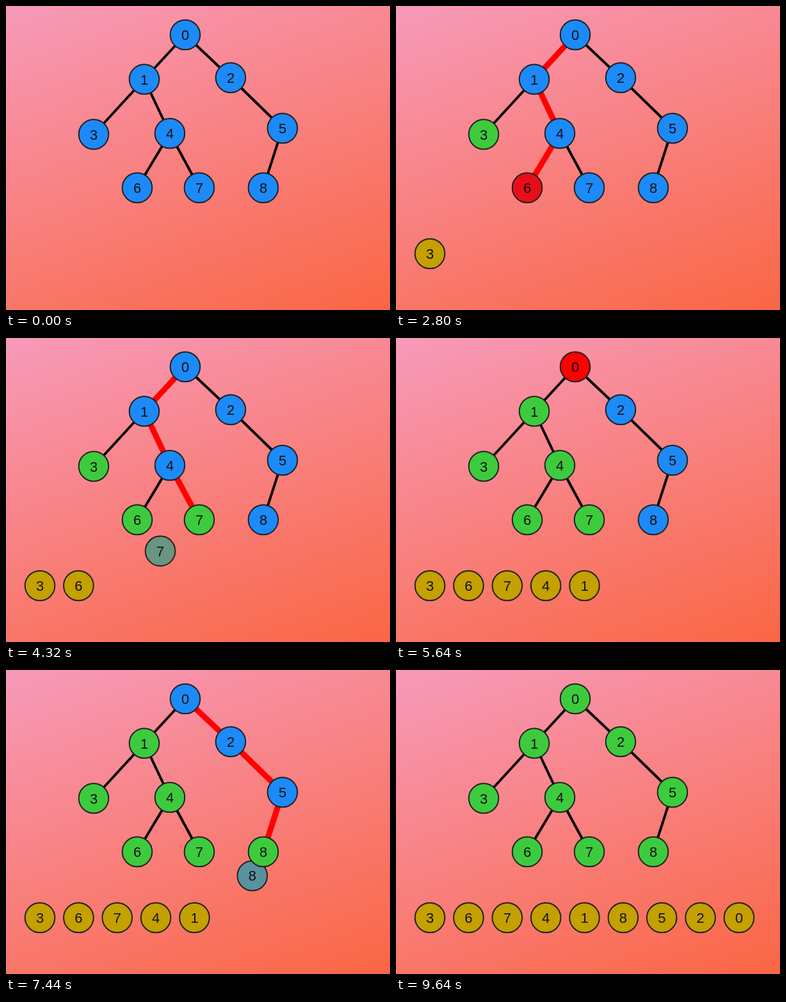
An HTML page with a canvas that plays this animation: 600 px wide and 475 px high, repeating every 9.68 s.

```html
<!DOCTYPE html>
<html lang="en">
<head>
<meta charset="utf-8">
<title>Post-order traversal</title>
<style>
  html, body { margin: 0; width: 100%; height: 100%; overflow: hidden; }
  body { background: linear-gradient(160deg, #f79aba, #fa6643); }
  canvas { display: block; width: 600px; height: 475px; }
</style>
</head>
<body>
<canvas id="stage" width="600" height="475"></canvas>
<script>
const ctx = document.getElementById('stage').getContext('2d');

const LOOP = 9680;
const STEP = 521.5;      // one visit
const START = 150;       // first visit begins
const FADE = 55;         // colour change of a node
const HOLD = 350;        // visit begin to fade out
const MOVE_AT = 460;     // visit begin to flight of the copy
const MOVE = 125;

const BLUE = [28, 138, 248];
const RED = [255, 0, 0];
const GREEN = [61, 203, 61];
const GOLD = [196, 160, 0];

const nodes = [
  [280, 45], [216, 114.5], [351, 112], [137, 200.5], [256, 199],
  [432, 191], [205, 284], [302, 284], [402, 284]
];
const children = { 0: [1, 2], 1: [3, 4], 2: [5], 4: [6, 7], 5: [8] };
const parent = {};
for (const p in children) for (const c of children[p]) parent[c] = +p;

// Every stop of the walk; the last stop at a node completes it.
const visits = [];
let finished = 0;
(function walk(id) {
  const stop = () => visits.push({ id, slot: -1, at: START + visits.length * STEP });
  stop();
  for (const c of children[id] || []) {
    walk(c);
    stop();
  }
  visits[visits.length - 1].slot = finished++;
})(0);

const ease = u => (1 - Math.cos(Math.PI * Math.min(1, Math.max(0, u)))) / 2;
const mix = (a, b, u) => a.map((v, i) => v + (b[i] - v) * u);
const rgb = c => `rgb(${c.map(Math.round).join(',')})`;

function nodeColor(id, t) {
  let color = BLUE;
  for (const v of visits) {
    if (v.id !== id || t < v.at) continue;
    color = mix(color, RED, ease((t - v.at) / FADE));
    color = mix(color, v.slot < 0 ? BLUE : GREEN, ease((t - v.at - HOLD) / FADE));
  }
  return color;
}

function drawEdges(t) {
  const current = visits.filter(v => v.at <= t).pop();
  const path = new Set();
  if (current) for (let id = current.id; id > 0; id = parent[id]) path.add(id);
  for (let id = 1; id < nodes.length; id++) {
    const hot = path.has(id);
    ctx.strokeStyle = hot ? '#f00' : '#000';
    ctx.lineWidth = hot ? 9 : 4;
    ctx.beginPath();
    ctx.moveTo(...nodes[parent[id]]);
    ctx.lineTo(...nodes[id]);
    ctx.stroke();
  }
}

function drawDisc([x, y], label, color) {
  ctx.beginPath();
  ctx.arc(x, y, 23.3, 0, Math.PI * 2);
  ctx.fillStyle = rgb(color);
  ctx.fill();
  ctx.strokeStyle = '#222';
  ctx.lineWidth = 2;
  ctx.stroke();
  ctx.fillStyle = '#111';
  ctx.fillText(label, x, y + 8);
}

function draw(t) {
  ctx.clearRect(0, 0, 600, 475);
  ctx.font = '22px "Liberation Sans", Arial, sans-serif';
  ctx.textAlign = 'center';
  drawEdges(t);
  for (const v of visits) {
    const time = t - v.at - MOVE_AT;
    if (v.slot < 0 || time < 0) continue;
    const u = ease(time / MOVE);
    const target = [53 + v.slot * 60.375, 387];
    drawDisc(mix(nodes[v.id], target, u), v.id, mix(BLUE, GOLD, u));
  }
  nodes.forEach((pos, id) => drawDisc(pos, id, nodeColor(id, t)));
}

const origin = performance.now();
function frame() {
  draw((performance.now() - origin) % LOOP);
  requestAnimationFrame(frame);
}
frame();
</script>
</body>
</html>
```
